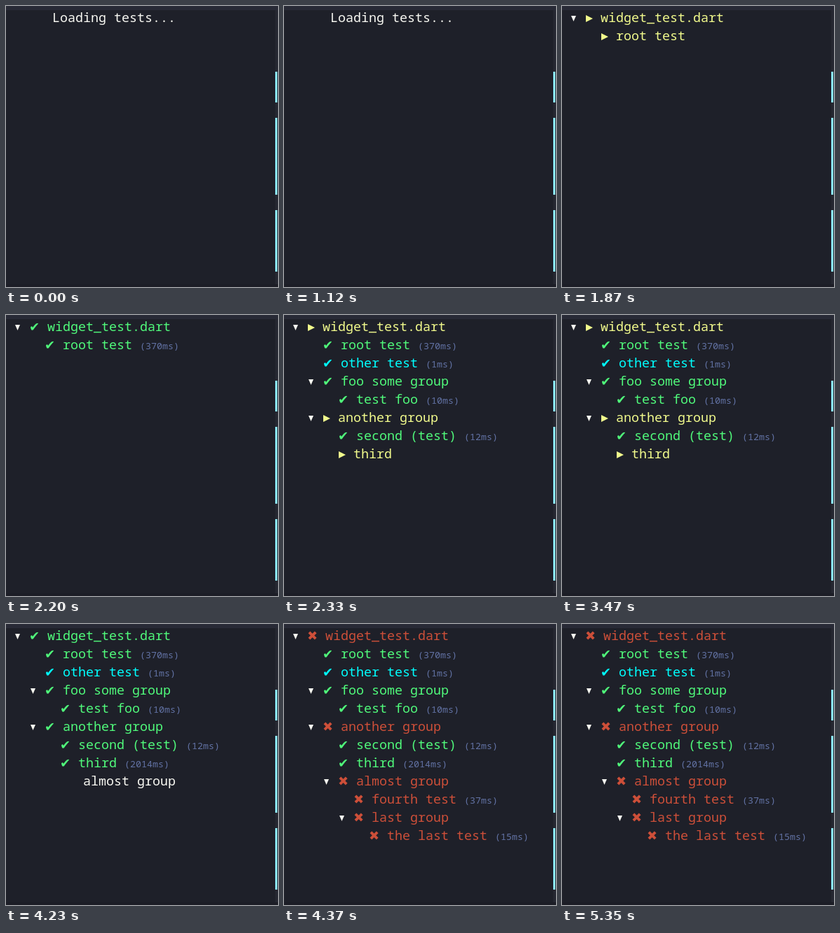
These frames come from a looping animation (388 px wide and 402 px high, 6.01 s). An HTML page:

```html
<!DOCTYPE html>
<html lang="en">
<head>
<meta charset="utf-8">
<title>Test tree</title>
<style>
  html, body { margin: 0; width: 388px; height: 402px; overflow: hidden; background: #1e2029; }
  svg { display: block; }
  text { font: 18.333px "Noto Sans Mono", monospace; white-space: pre; }
  .small { font-size: 13.333px; }
  .mark { font: 18px "DejaVu Sans", sans-serif; }
</style>
</head>
<body>
<svg id="stage" width="388" height="402" viewBox="0 0 388 402">
  <rect width="388" height="6" fill="#282a36"/>
  <rect y="398" width="388" height="4" fill="#1c1d26"/>
  <rect x="384" y="6" width="4" height="392" fill="#252731"/>
  <path d="M384 94h3v44h-3zM384 160h3v110h-3zM384 292h3v88h-3z" fill="#8be9fd"/>
  <g id="tree"></g>
</svg>
<script>
const LOOP = 6010, CELL = 11, LINE = 26, BASE = 23;
const COLORS = { run: '#f1fa8c', pass: '#50fa7b', skip: '#00ffff', fail: '#cd4f39', plain: '#f8f8f2', time: '#6272a4' };
const MARKS = { pass: '✔', skip: '✔', fail: '✖' };
const tree = document.getElementById('tree');

function add(parent, tag, attrs, content = '') {
  const node = document.createElementNS('http://www.w3.org/2000/svg', tag);
  for (const key in attrs) node.setAttribute(key, attrs[key]);
  node.textContent = content;
  parent.appendChild(node);
  return node;
}

// Each row: depth, label, state, duration, and whether it can be folded.
const file = state => [0, 'widget_test.dart', state, '', true];
const root = (state, time) => [1, 'root test', state, time];
const another = state => [1, 'another group', state, '', true];
const middle = [
  root('pass', '370ms'),
  [1, 'other test', 'skip', '1ms'],
  [1, 'foo some group', 'pass', '', true],
  [2, 'test foo', 'pass', '10ms']
];
const second = [2, 'second (test)', 'pass', '12ms'];
const third = [2, 'third', 'pass', '2014ms'];

const scenes = [
  [0, [[1, 'Loading tests...', 'plain']]],
  [1870, [file('run'), root('run')]],
  [2200, [file('pass'), root('pass', '370ms')]],
  [2330, [file('run'), ...middle, another('run'), second, [2, 'third', 'run']]],
  [4230, [file('pass'), ...middle, another('pass'), second, third, [3, 'almost group', 'plain']]],
  [4370, [file('fail'), ...middle, another('fail'), second, third,
    [2, 'almost group', 'fail', '', true],
    [3, 'fourth test', 'fail', '37ms'],
    [3, 'last group', 'fail', '', true],
    [4, 'the last test', 'fail', '15ms']]]
].map(([start, rows]) => {
  const group = add(tree, 'g', { visibility: 'hidden' });
  rows.forEach((row, i) => drawRow(group, row, BASE + i * LINE));
  return { start, group };
});

function drawRow(group, [depth, label, state, time, folds], y) {
  const iconX = 33 + depth * 2 * CELL;
  const fill = COLORS[state];
  let x = iconX + CELL;
  if (folds) {
    add(group, 'path', { d: `M${iconX - 20} ${y - 9}h7l-3.5 8z`, fill: COLORS.plain });
  }
  if (state === 'run') {
    add(group, 'path', { d: `M${iconX + 1} ${y - 10}l10 5l-10 5z`, fill });
    x += CELL;
  } else if (MARKS[state]) {
    add(group, 'text', { x: iconX, y, fill, class: 'mark' }, MARKS[state]);
    x += 15;
  }
  add(group, 'text', { x, y, fill }, label);
  if (time) {
    const timeX = x + (label.length + 1) * CELL;
    add(group, 'text', { x: timeX, y, fill: COLORS.time, class: 'small' }, `(${time})`);
  }
}

const origin = performance.now();
let shown;
function frame() {
  const t = (performance.now() - origin) % LOOP;
  const scene = scenes.filter(s => s.start <= t).pop();
  if (scene !== shown) {
    shown?.group.setAttribute('visibility', 'hidden');
    scene.group.setAttribute('visibility', 'visible');
    shown = scene;
  }
  requestAnimationFrame(frame);
}
frame();
</script>
</body>
</html>
```
